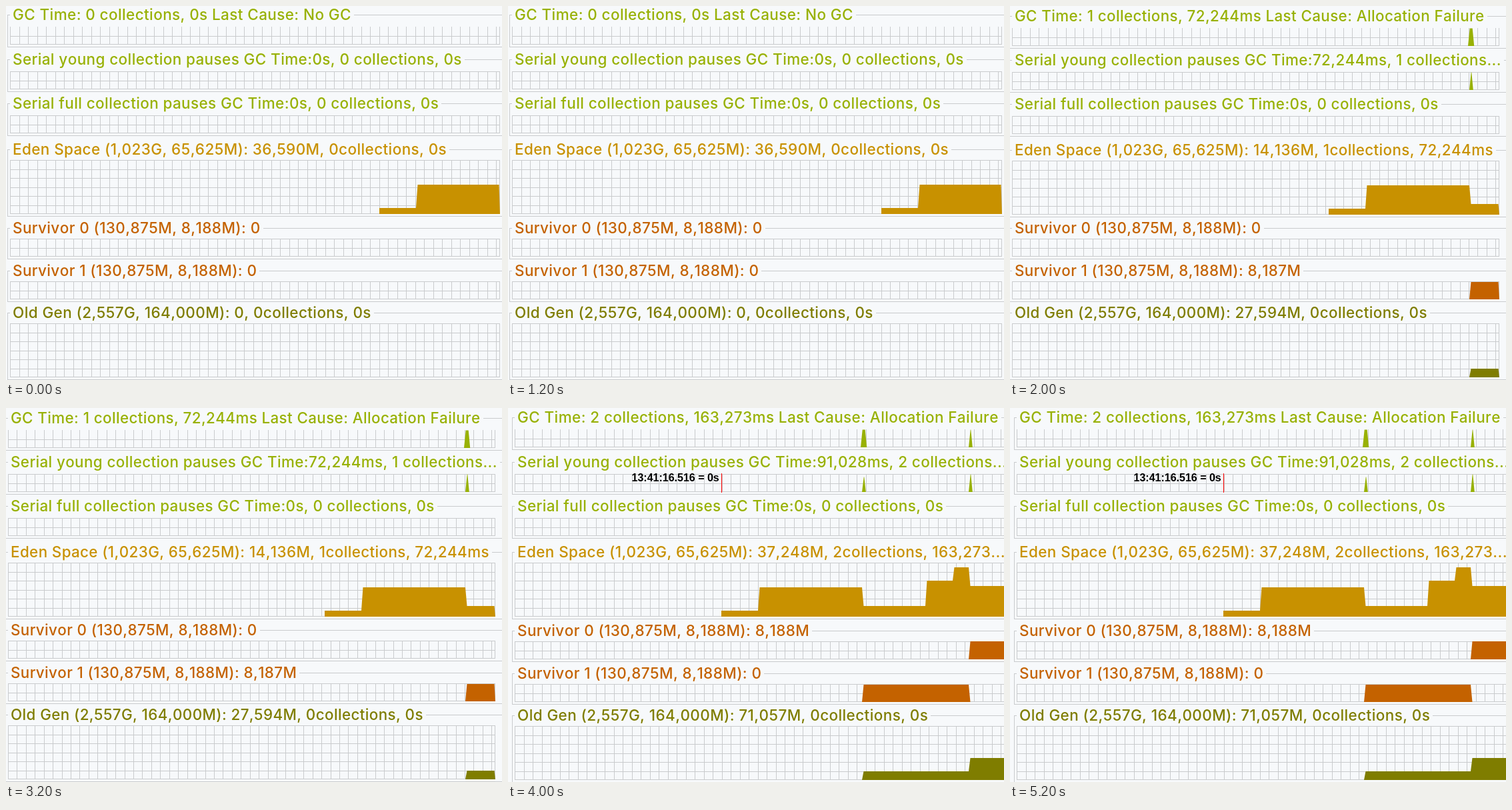
These frames come from a looping animation (744x561 px, 6 s). An HTML page:

```html
<!DOCTYPE html>
<html lang="en">
<head>
<meta charset="utf-8">
<title>Garbage collector monitor</title>
<style>
html, body { margin: 0; width: 100%; height: 100%; overflow: hidden; background: #f7f9fb; }
#stage { position: relative; width: 744px; height: 561px; overflow: hidden; }
.scene {
  position: absolute; inset: 0; overflow: hidden; background: #f7f9fb;
  visibility: hidden; animation: show 6s step-end infinite;
}
@keyframes show { 0% { visibility: visible; } 33.3333%, 100% { visibility: hidden; } }
svg { position: absolute; left: 0; top: 0; }
.title {
  position: absolute; padding: 0 4px; background: #f7f9fb; white-space: pre;
  font-family: Inter, sans-serif; font-weight: 500; line-height: 24px;
  letter-spacing: .0175em; font-kerning: none; font-feature-settings: "calt" 0;
}
.line { stroke: #c9cbcd; fill: none; shape-rendering: crispEdges; }
.stamp { font: bold 16px "Liberation Sans", Arial, sans-serif; }
</style>
</head>
<body>
<div id="stage"></div>
<script>
const LIME = '#98b104', GOLD = '#c89100', RUST = '#c46200', OLIVE = '#7f7d00';
const CELL = 13.5, SLOPE = 2.5;
const GC1 = 211, GC2 = 371; // collections, in px since the start of the recording

// y: title centre, h: chart height, steps: [time, level], spikes: [time, height, flat top]
const panels = [
  { y: 13, h: 29, color: LIME, spikes: [[GC1 - 2, 28, 4], [GC2, 28, .6]],
    title: s => `GC Time: ${s.total} Last Cause: ${s.cause}` },
  { y: 80, h: 29, color: LIME, spikes: [[GC1, 22, .6], [GC2, 26, .6]],
    title: s => `Serial young collection pauses GC Time:${s.young}` },
  { y: 146, h: 29, color: LIME,
    title: () => 'Serial full collection pauses GC Time:0s, 0 collections, 0s' },
  { y: 215, h: 81, color: GOLD, steps: [[0, 9], [55, 44], [GC1, 16], [306, 54], [347, 74], [GC2, 46]],
    title: s => `Eden Space (1,023G, 65,625M): ${s.eden}` },
  { y: 333, h: 27, color: RUST, steps: [[GC2, 27]],
    title: s => `Survivor 0 (130,875M, 8,188M): ${s.s0}` },
  { y: 397, h: 27, color: RUST, steps: [[GC1, 26], [GC2, 0]],
    title: s => `Survivor 1 (130,875M, 8,188M): ${s.s1}` },
  { y: 460, h: 81, color: OLIVE, steps: [[GC1, 13], [GC2, 33]],
    title: s => `Old Gen (2,557G, 164,000M): ${s.old}, 0collections, 0s` }
];

// start: x where the recording begins
const scenes = [
  { left: 6, right: 741, start: 560, dy: 0, zoom: 1,
    total: '0 collections, 0s', cause: 'No GC', young: '0s, 0 collections, 0s',
    eden: '36,590M, 0collections, 0s', s0: '0', s1: '0', old: '0' },
  { left: 3, right: 734, start: 478, dy: 1.8, zoom: .995,
    total: '1 collections, 72,244ms', cause: 'Allocation Failure', young: '72,244ms, 1 collections...',
    eden: '14,136M, 1collections, 72,244ms', s0: '0', s1: '8,187M', old: '27,594M' },
  { left: 10, right: 747, start: 320, dy: 1, zoom: 1,
    total: '2 collections, 163,273ms', cause: 'Allocation Failure', young: '91,028ms, 2 collections...',
    eden: '37,248M, 2collections, 163,273...', s0: '8,188M', s1: '0', old: '71,057M',
    extra: '<path d="M320.5 98V127" stroke="#f00"/><text class="stamp" x="185.5" y="110">13:41:16.516 = 0s</text>' }
];

function area(steps, s, base) {
  const seen = steps.filter(([t]) => s.start + t < s.right);
  if (!seen.length) return '';
  let d = '', level = 0;
  for (const [t, next] of seen) {
    const x = s.start + t;
    d += `${d ? 'L' : 'M'}${x} ${base - level}L${x + (t && SLOPE)} ${base - next}`;
    level = next;
  }
  return d + `L${s.right - 1.5} ${base - level}L${s.right} ${base}Z`;
}

function spikes(list, s, base) {
  const seen = list.filter(([t]) => s.start + t < s.right);
  const max = Math.max(...seen.map(([, h]) => h));
  return seen.map(([t, h, flat]) =>
    `M${s.start + t} ${base}l2.7 ${-26.5 * h / max}h${flat}L${s.start + t + flat + 5.2} ${base}Z`).join('');
}

const px = v => Math.round(v) + .5;

function chart(p, i, s, mid) {
  const { left, right, zoom } = s;
  const base = mid + Math.round((16 + p.h) * zoom), top = base - Math.floor(p.h / CELL) * CELL * zoom;
  let d = `M744 ${px(mid)}H${left - 3.5}V${px(base + 3)}H744M${left} ${base - .5}H${right}`;
  for (let x = left; x < right; x += CELL * zoom) d += `M${px(x)} ${top}V${base}`;
  d += `M${px(right - 1)} ${top}V${base}`;
  for (let y = i ? top : top + CELL; y < base - 1; y += CELL * zoom) d += `M${left} ${px(y)}H${right}`;
  const fill = (p.steps ? area(p.steps, s, base) : '') + (p.spikes ? spikes(p.spikes, s, base) : '');
  return `<path class="line" d="${d}"/><path fill="${p.color}" d="${fill}"/>`;
}

function scene(s, n) {
  let charts = '', titles = '';
  panels.forEach((p, i) => {
    const mid = Math.round(p.y * s.zoom + s.dy);
    charts += chart(p, i, s, mid);
    titles += `<span class="title" style="left:${s.left}px;top:${mid - 12}px;` +
      `font-size:${22.5 * s.zoom}px;color:${p.color}">${p.title(s)}</span>`;
  });
  return `<div class="scene" style="animation-delay:${n * 2 - 6}s">` +
    `<svg width="744" height="561">${charts}${s.extra || ''}</svg>${titles}</div>`;
}

document.getElementById('stage').innerHTML = scenes.map(scene).join('');
</script>
</body>
</html>
```
